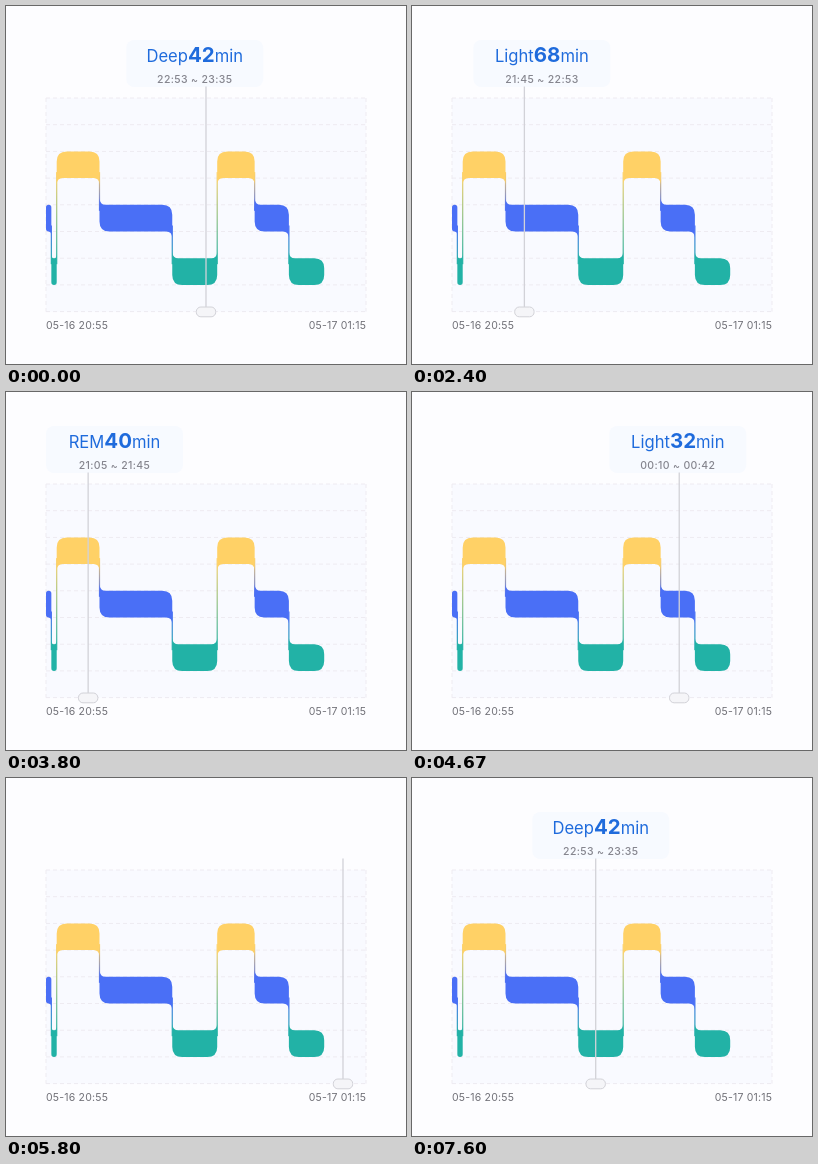
Write an HTML page that moves like this. It is 400x358 px and loops after 7.67 s.

```html
<!DOCTYPE html>
<html lang="en">
<head>
<meta charset="utf-8">
<title>Sleep stages</title>
<style>
html, body { margin: 0; width: 100%; height: 100%; overflow: hidden; background: #fdfdff; }
svg { display: block; width: 100%; height: 100%; font-family: Inter, sans-serif; }
.date { font-size: 10.5px; letter-spacing: .2px; fill: #717178; }
.span { font-size: 10.5px; font-weight: 500; letter-spacing: .35px; fill: #85858e; }
.title { font-size: 16.6px; fill: #1f6bdc; }
.count { font-size: 20.5px; font-weight: 700; }
</style>
</head>
<body>
<svg viewBox="0 0 400 358" xmlns="http://www.w3.org/2000/svg">
  <defs id="defs"></defs>
  <rect width="400" height="358" fill="#fdfdff"/>
  <rect x="40" y="92" width="320" height="213.6" fill="#f9faff"/>
  <path id="grid" fill="none" stroke="#eeebf1" stroke-dasharray="4 3"/>
  <g id="bars"></g>
  <text class="date" x="40" y="323">05-16 20:55</text>
  <text class="date" x="360.2" y="323" text-anchor="end">05-17 01:15</text>
  <g id="tip" text-anchor="middle">
    <rect x="-68.5" y="34" width="137" height="47" rx="8" fill="#f7faff"/>
    <text class="title" y="55.5"><tspan id="stage"></tspan><tspan id="count" class="count"></tspan><tspan>min</tspan></text>
    <text id="span" class="span" y="77"></text>
  </g>
  <g id="cursor" stroke="#d2d2d8">
    <path d="M0 80.5V301" stroke-width="1.3"/>
    <rect x="-9.7" y="301" width="19.4" height="9.8" rx="4.6" fill="#f5f5f8"/>
  </g>
</svg>
<script>
const $ = id => document.getElementById(id);
const LOOP = 7670, LEFT = 40, RIGHT = 360, TOP = 92, ROW = 26.7, PX_PER_MIN = 1.07;
const START = 20 * 60 + 55;

const stages = {
  REM: { row: 2, color: '#ffd166' },
  Light: { row: 4, color: '#4a6ff6' },
  Deep: { row: 6, color: '#22b2a6' }
};

let minute = 0;
const segments = [
  ['Light', 5], ['Deep', 5], ['REM', 40], ['Light', 68],
  ['Deep', 42], ['REM', 35], ['Light', 32], ['Deep', 33]
].map(([name, length]) => {
  const from = minute;
  minute += length;
  return {
    name, length, from, to: minute,
    x0: LEFT + from * PX_PER_MIN, x1: LEFT + minute * PX_PER_MIN,
    y0: TOP + stages[name].row * ROW, y1: TOP + (stages[name].row + 1) * ROW,
    color: stages[name].color
  };
});

// Cursor drag: [time, x]
const drag = [
  [0, 200], [1270, 200], [1730, 185], [2300, 124], [2800, 67], [3000, 51],
  [3130, 40], [3400, 40], [3800, 82], [4130, 146], [4670, 267], [4930, 330],
  [5200, 337], [5800, 337], [6200, 318], [6600, 270], [7000, 210],
  [7330, 183.7], [LOOP, 183.7]
];

const slope = i => (drag[i + 1][1] - drag[i][1]) / (drag[i + 1][0] - drag[i][0]);
const tangents = drag.map((_, i) => {
  if (i === 0 || i === drag.length - 1) return 0;
  const a = slope(i - 1), b = slope(i);
  return a * b > 0 ? 2 * a * b / (a + b) : 0;
});

// Monotone cubic through the drag points
function cursorAt(t) {
  let i = 0;
  while (i < drag.length - 2 && t >= drag[i + 1][0]) i++;
  const [t0, a] = drag[i], [t1, b] = drag[i + 1];
  const h = t1 - t0, u = (t - t0) / h, v = 1 - u;
  return a * v * v * (1 + 2 * u) + b * u * u * (3 - 2 * u) +
    h * u * v * (tangents[i] * v - tangents[i + 1] * u);
}

function clock(min) {
  const m = (START + min) % 1440;
  const pad = n => String(n).padStart(2, '0');
  return pad(Math.floor(m / 60)) + ':' + pad(m % 60);
}

// Bar with round free corners and square ones where a link joins
function barPath({ x0, x1, y0, y1 }, prev, next) {
  const r = Math.min(10, (x1 - x0) / 2);
  const up = s => s && s.y0 < y0, down = s => s && s.y0 > y0;
  const tl = up(prev) ? 0 : r, tr = up(next) ? 0 : r;
  const bl = down(prev) ? 0 : r, br = down(next) ? 0 : r;
  let d = `M${x0 + tl} ${y0}H${x1 - tr}Q${x1} ${y0} ${x1} ${y0 + tr}V${y1 - br}` +
    `Q${x1} ${y1} ${x1 - br} ${y1}H${x0 + bl}Q${x0} ${y1} ${x0} ${y1 - bl}` +
    `V${y0 + tl}Q${x0} ${y0} ${x0 + tl} ${y0}Z`;
  const f = Math.min(6, (x1 - x0) / 2);
  const fillet = (x, sx, s) => {
    if (!s) return;
    const below = s.y0 > y0, y = below ? y1 : y0, sy = below ? 1 : -1;
    d += `M${x} ${y}V${y + sy * f}Q${x + sx * .5} ${y} ${x + sx * f} ${y}Z`;
  };
  fillet(x0, 1, prev);
  fillet(x1, -1, next);
  return d;
}

function drawChart() {
  let grid = `M${LEFT} ${TOP}V${TOP + 8 * ROW}M${RIGHT} ${TOP}V${TOP + 8 * ROW}`;
  for (let i = 0; i <= 8; i++) grid += `M${LEFT} ${TOP + i * ROW}H${RIGHT}`;
  $('grid').setAttribute('d', grid);

  let defs = '', links = '', bars = '';
  segments.forEach((s, i) => {
    const next = segments[i + 1];
    bars += `<path d="${barPath(s, segments[i - 1], next)}" fill="${s.color}"/>`;
    if (!next) return;
    const [hi, lo] = s.y0 < next.y0 ? [s, next] : [next, s];
    defs += `<linearGradient id="link${i}" x1="0" y1="0" x2="0" y2="1">` +
      `<stop stop-color="${hi.color}"/><stop offset="1" stop-color="${lo.color}"/></linearGradient>`;
    links += `<rect x="${s.x1 - .6}" y="${hi.y1 - 6}" width="1.2" ` +
      `height="${lo.y0 - hi.y1 + 12}" fill="url(#link${i})"/>`;
  });
  $('defs').innerHTML = defs;
  $('bars').innerHTML = links + bars;
}

function draw(t) {
  const x = cursorAt(t);
  $('cursor').setAttribute('transform', `translate(${x.toFixed(2)} 0)`);
  const s = segments.find(s => x >= s.x0 && x < s.x1);
  $('tip').setAttribute('visibility', s ? 'visible' : 'hidden');
  if (!s) return;
  const mid = Math.min(RIGHT - 68.5, Math.max(LEFT + 68.5, (s.x0 + s.x1) / 2));
  $('tip').setAttribute('transform', `translate(${mid} 0)`);
  $('stage').textContent = s.name;
  $('count').textContent = s.length;
  $('span').textContent = `${clock(s.from)} ~ ${clock(s.to)}`;
}

drawChart();
const begin = performance.now();
function tick() {
  draw((performance.now() - begin) % LOOP);
  requestAnimationFrame(tick);
}
tick();
</script>
</body>
</html>
```
